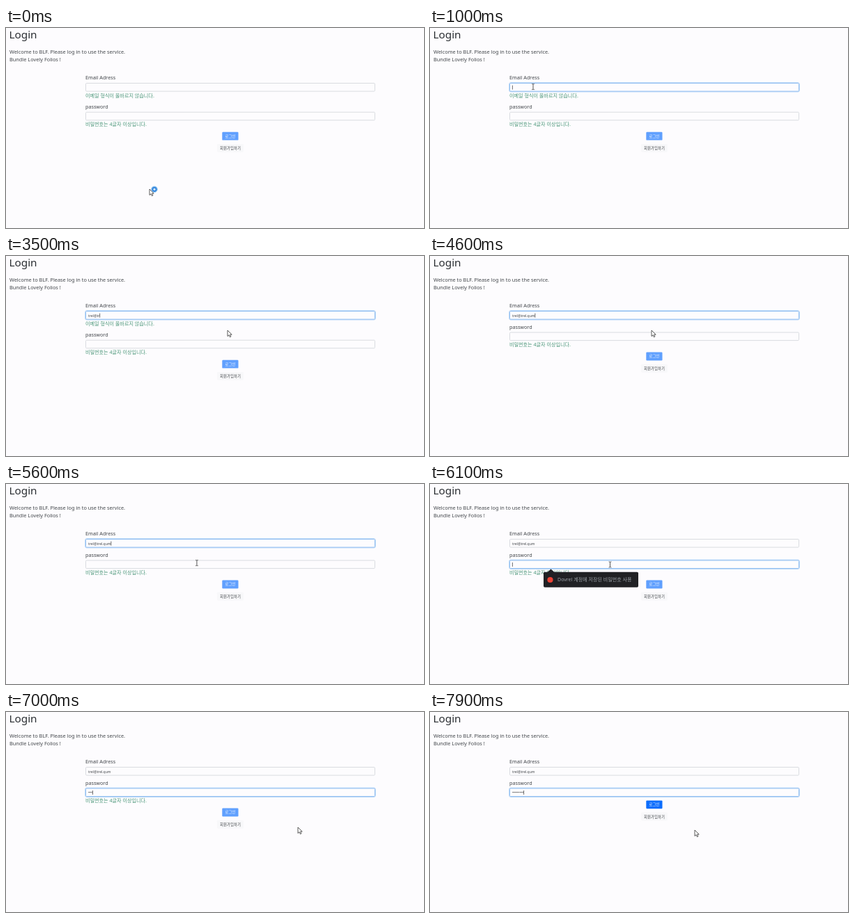
Animation, 600 px wide and 288 px high, one loop 8000 ms. Source, as an HTML page:

```html
<!DOCTYPE html>
<html lang="ko">
<head>
<meta charset="utf-8">
<title>Login</title>
<style>
  html, body { margin: 0; width: 100%; height: 100%; overflow: hidden; background: #fdfcfe; }
  svg { display: block; width: 600px; height: 288px; }
  text { font: 7.2px "Noto Sans", "Noto Sans CJK KR", "Noto Sans CJK", sans-serif; fill: #43474b; white-space: pre; }
  .title { font-size: 15.3px; fill: #2b2f33; }
  .body { font-size: 7.35px; }
  .error { font-size: 7.1px; fill: #4a9678; }
  .value { font-size: 5px; }
  .dots { font-size: 5.4px; fill: #222; }
  .btn { font-size: 5.4px; text-anchor: middle; }
  .box { fill: #fdfcfe; stroke: #d9dce0; stroke-width: 1; }
  .box.on { stroke: #8fbdf0; }
  .ring { fill: none; stroke: #b3d4f7; stroke-width: 1; }
  .caret { stroke: #333; stroke-width: .7; }
</style>
</head>
<body>
<svg viewBox="0 0 600 288">
  <rect width="600" height="288" fill="#fdfcfe"/>
  <text class="title" x="4.5" y="15">Login</text>
  <text class="body" x="5" y="37">Welcome to BLF. Please log in to use the service.</text>
  <text class="body" x="5" y="48">Bundle Lovely Folios !</text>

  <text x="114" y="74">Email Adress</text>
  <rect class="ring" id="mailRing" x="113.7" y="78.7" width="416.6" height="13.2" rx="2"/>
  <rect class="box" id="mailBox" x="114.5" y="79.5" width="415" height="11.6" rx="1.3"/>
  <text class="value" id="mail" x="118" y="87.6"></text>
  <path class="caret" id="mailCaret" d="M0 82.6v6"/>
  <text class="error" id="mailError" x="114" y="99.5">이메일 형식이 올바르지 않습니다.</text>

  <g id="passGroup">
    <text x="114" y="116">password</text>
    <rect class="ring" id="passRing" x="113.7" y="120.4" width="416.6" height="13.2" rx="2"/>
    <rect class="box" id="passBox" x="114.5" y="121.2" width="415" height="11.6" rx="1.3"/>
    <text class="dots" id="pass" x="118" y="129.4"></text>
    <path class="caret" id="passCaret" d="M0 124.2v6"/>
    <text class="error" id="passError" x="114" y="141.3">비밀번호는 4글자 이상입니다.</text>
  </g>

  <g id="buttons">
    <rect id="login" x="310.3" y="149.8" width="23.2" height="11.8" rx="1.2" fill="#0d6efd"/>
    <text class="btn" x="322" y="157.7" style="fill:#fff">로그인</text>
    <rect x="303" y="167" width="38" height="12" rx="1.4" fill="#f8f8fa"/>
    <text class="btn" x="322" y="175">회원가입하기</text>
  </g>

  <g id="popup">
    <path d="M168 127.5L173.5 122.5L179 127.5Z" fill="#202124"/>
    <rect x="163" y="126.7" width="136" height="22" rx="1.8" fill="#202124"/>
    <circle cx="172.5" cy="138" r="4.1" fill="#ea4335"/>
    <text x="183" y="140.4" style="font-size:7.05px;fill:#9aa0a6">Dovrel 계정에 저장된 비밀번호 사용</text>
  </g>

  <g id="cursor">
    <g id="arrow">
      <path d="M0 0V8.6L2 6.8L3.4 9.8L4.9 9.1L3.5 6.2H6.2Z" fill="#fff" stroke="#333" stroke-width=".8" stroke-linejoin="round"/>
      <g id="busy">
        <circle cx="7" cy=".3" r="4.3" fill="#3a8ade" stroke="#a9d4f5" stroke-width="1"/>
        <circle cx="7" cy=".3" r="1.5" fill="#d8ebfb"/>
      </g>
    </g>
    <path id="beam" d="M-1.8 -4H-.5L0 -3.5L.5 -4H1.8M0 -3.5V3.5M-1.8 4H-.5L0 3.5L.5 4H1.8" fill="none" stroke="#444" stroke-width=".9"/>
  </g>
</svg>
<script>
const LOOP = 8000, STEP = 100, SHIFT = 11.2;
const MAIL = "trel@trel.qum";
const MAIL_FOCUS = 1000, PASS_FOCUS = 5900, POPUP_AT = 6000;

// Time of each keystroke
const mailKeys = [2700, 2800, 2900, 2900, 3100, 3400, 3500, 3600, 3700, 3900, 4000, 4200, 4300];
const passKeys = [6700, 6800, 7000, 7100, 7200, 7400, 7500, 7600];

// Pointer path: time, x, y
const path = [
  [0, 206, 232], [800, 148, 84.6], [1200, 148, 84.6], [1700, 301, 109],
  [1800, 301, 109], [2100, 297, 104], [2200, 297, 104], [2600, 318, 107],
  [5200, 318, 107], [5800, 258.5, 116], [6200, 258.5, 116], [6900, 419, 166],
  [7100, 419, 166], [7700, 388, 174], [7800, 388, 174], [7900, 380, 170], [LOOP, 380, 170]
];

const el = {};
document.querySelectorAll("[id]").forEach(e => el[e.id] = e);

const show = (e, on) => e.setAttribute("display", on ? "inline" : "none");
const move = (e, x, y) => e.setAttribute("transform", `translate(${x} ${y})`);
const typed = (keys, t) => keys.filter(k => k <= t).length;

function pointer(t) {
  const i = path.findIndex((p, n) => n > 0 && t <= p[0]);
  const [t0, x0, y0] = path[i - 1], [t1, x1, y1] = path[i];
  const u = (t - t0) / (t1 - t0), k = u * u * (3 - 2 * u);
  return [x0 + (x1 - x0) * k, y0 + (y1 - y0) * k];
}

function field(name, value, focused, since, t) {
  el[name].textContent = value;
  el[name + "Box"].classList.toggle("on", focused);
  show(el[name + "Ring"], focused);
  const caret = el[name + "Caret"];
  show(caret, focused && (t - since) % 1000 < 500);
  const width = value ? el[name].getComputedTextLength() : 0;
  move(caret, 118.4 + width, 0);
}

function draw(t) {
  const nMail = typed(mailKeys, t), nPass = typed(passKeys, t);
  const mailOk = nMail >= 12, passOk = nPass >= 4;
  const passY = mailOk ? -SHIFT : 0;

  field("mail", MAIL.slice(0, nMail), t >= MAIL_FOCUS && t < PASS_FOCUS,
    mailKeys[nMail - 1] || MAIL_FOCUS, t);
  field("pass", "•".repeat(nPass), t >= PASS_FOCUS,
    passKeys[nPass - 1] || PASS_FOCUS, t);

  show(el.mailError, !mailOk);
  show(el.passError, !passOk);
  move(el.passGroup, 0, passY);
  move(el.buttons, 0, passY - (passOk ? SHIFT : 0));
  el.login.setAttribute("opacity", mailOk && passOk ? 1 : .65);
  show(el.popup, t >= POPUP_AT && !nPass);

  const [x, y] = pointer(t);
  const top = 121 + passY;
  const overField = x > 114 && x < 530 && (y > 79 && y < 92 || y > top && y < top + 12);
  move(el.cursor, x, y);
  show(el.arrow, !overField);
  show(el.beam, overField);
  show(el.busy, t < 300);
}

function tick() {
  draw(Math.floor(performance.now() % LOOP / STEP) * STEP);
  requestAnimationFrame(tick);
}
tick();
</script>
</body>
</html>
```
